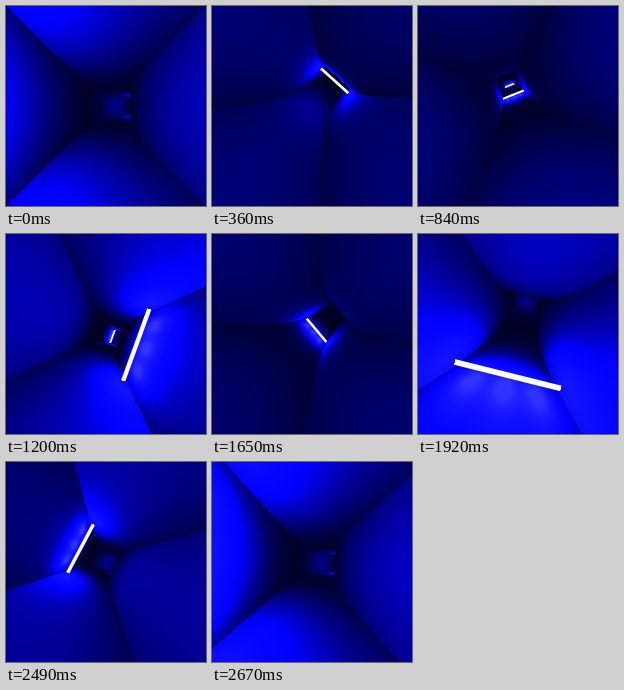
An HTML page with a canvas for the animation above (2.7 s loop, 200 px wide and 200 px high).

```html
<!DOCTYPE html>
<html>
<head>
<meta charset="utf-8">
<title>Blue tunnel</title>
<style>
html, body { margin: 0; height: 100%; overflow: hidden; background: #000; }
canvas { display: block; width: 100vw; height: 100vh; }
</style>
</head>
<body>
<canvas id="stage" width="200" height="200"></canvas>
<script>
const SIZE = 200, LOOP = 2700, FRAME = 30;
const FOCAL = 55;            // pixels
const WALL = 0.28;           // half width of the square tunnel
const LAMP_X = 0.218, LAMP_Y = 0.243;
const SPACING = Math.PI / 2; // distance between lamps, four per loop
const STEP = 0.025, STEPS = 240;
const SAMPLES = [-0.15, 0, 0.15];
const LAMP_POWER = 50, HEADLIGHT = 24;

const ctx = document.getElementById('stage').getContext('2d');
const image = ctx.createImageData(SIZE, SIZE);
const bend = new Float32Array(STEPS + 1);

const lampSide = k => k % 2 ? 1 : -1;

// Sideways drift of the tunnel as seen by a camera looking along its tangent
const drift = (pos, z) => Math.sin(pos) - Math.sin(pos + z) + z * Math.cos(pos);

// Distance at which a ray of slope (u, v) meets a wall
function trace(u, v) {
  const zFloor = WALL / Math.max(Math.abs(v), 1e-6);
  let before = 0;
  for (let i = 1; i <= STEPS; i++) {
    const z = i * STEP, x = u * z - bend[i], gap = Math.abs(x);
    if (gap > WALL) {
      const edge = Math.sign(x) * WALL;
      const zWall = z - STEP + STEP * (edge - before) / (x - before);
      return zWall < zFloor ? { z: zWall, side: true } : { z: zFloor, side: false };
    }
    if (z >= zFloor) return { z: zFloor, side: false };
    before = x;
  }
  return { z: STEPS * STEP, side: false };
}

function lampLight(k, x, y, along, side) {
  const dx = x - lampSide(k) * LAMP_X;
  const dz = along - k * SPACING;
  let sum = 0;
  for (const s of SAMPLES) {
    const dy = y - s;
    const r2 = dx * dx + dy * dy + dz * dz;
    sum += Math.abs(side ? dx : dy) / Math.pow(r2, 1.25);
  }
  return LAMP_POWER * sum / SAMPLES.length;
}

function draw(t) {
  const pos = t * 2 * Math.PI;
  const cos = Math.cos(pos), sin = Math.sin(pos);
  for (let i = 0; i <= STEPS; i++) bend[i] = drift(pos, i * STEP);

  const lamps = [];
  for (let k = Math.floor(pos / SPACING) + 1; lamps.length < 3; k++) {
    const z = k * SPACING - pos;
    lamps.push({ z, x: drift(pos, z) + lampSide(k) * LAMP_X, half: 0.6 + 0.55 / z });
  }

  let p = 0;
  for (let py = 0; py < SIZE; py++) {
    for (let px = 0; px < SIZE; px++) {
      const dx = (px + 0.5 - SIZE / 2) / FOCAL, dy = (py + 0.5 - SIZE / 2) / FOCAL;
      const u = dx * cos - dy * sin, v = dx * sin + dy * cos;
      const { z, side } = trace(u, v);
      const x = u * z - drift(pos, z), y = v * z, along = pos + z;
      const k = Math.floor(along / SPACING);

      const light = HEADLIGHT * WALL / (x * x + y * y + z * z)
        + lampLight(k, x, y, along, side)
        + lampLight(k + 1, x, y, along, side);

      let white = 0;
      for (const lamp of lamps) {
        if (z < lamp.z - 0.05 || Math.abs(v * lamp.z) > LAMP_Y) continue;
        const off = Math.abs(u - lamp.x / lamp.z) * FOCAL;
        white = Math.max(white, Math.min(1, lamp.half + 0.5 - off));
      }

      const spill = Math.min(50, Math.max(0, light - 255) * 0.06);
      const grey = spill + (255 - spill) * white;
      const blue = Math.min(255, light);
      image.data[p++] = grey;
      image.data[p++] = grey;
      image.data[p++] = blue + (255 - blue) * white;
      image.data[p++] = 255;
    }
  }
  ctx.putImageData(image, 0, 0);
}

let shown = -1;
function tick() {
  const frame = Math.floor(performance.now() % LOOP / FRAME);
  if (frame !== shown) draw((shown = frame) * FRAME / LOOP);
  requestAnimationFrame(tick);
}
tick();
</script>
</body>
</html>
```
